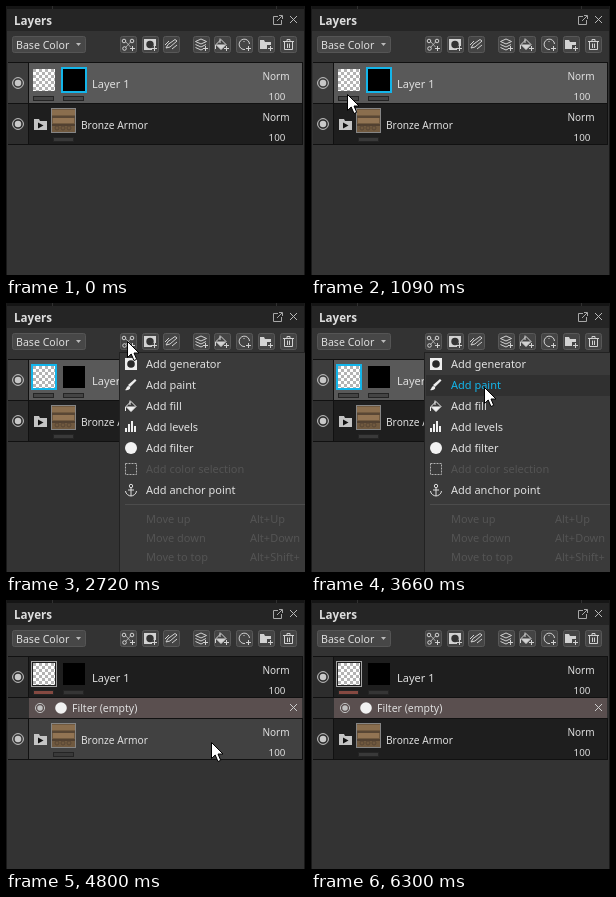
These frames come from a looping animation (299x269 px, 6.64 s). An HTML page with a canvas:

```html
<!DOCTYPE html>
<html lang="en">
<head>
<meta charset="utf-8">
<title>Layers panel</title>
<style>
html, body { margin: 0; width: 100%; height: 100%; overflow: hidden; background: #333; }
canvas { display: block; width: 299px; height: 269px; }
</style>
</head>
<body>
<canvas id="stage" width="299" height="269"></canvas>
<script>
const ctx = document.getElementById('stage').getContext('2d');
const LOOP = 6640;
const CYAN = '#13b5ea', LIGHT = '#dedede';

// Pointer moves: start, end, step count, destination
const START = [150, 280];
const MOVES = [
  [460, 1090, 8, 36, 88],
  [1180, 1270, 2, 35, 75],
  [1850, 2480, 8, 121, 38],
  [3250, 3840, 8, 204, 111],
  [3930, 4470, 7, 205, 142],
  [5860, 6300, 6, 277, 247]
];
const MENU = ['Add generator', 'Add paint', 'Add fill', 'Add levels',
  'Add filter', 'Add color selection', 'Add anchor point'];
const MOVE_ITEMS = [['Move up', 'Alt+Up'], ['Move down', 'Alt+Down'], ['Move to top', 'Alt+Shift+']];

function pointerAt(t) {
  let [x, y] = START;
  for (const [start, end, steps, toX, toY] of MOVES) {
    if (t < start) break;
    const step = Math.min(steps, 1 + Math.floor((t - start) * (steps - 1) / (end - start) + 1e-6));
    x += (toX - x) * step / steps;
    y += (toY - y) * step / steps;
  }
  return { x: Math.round(x), y: Math.round(y), visible: t >= 460 && t < 6300 };
}

function rect(x, y, w, h, color) {
  ctx.fillStyle = color;
  ctx.fillRect(x, y, w, h);
}

function frame(x, y, w, h, color, width = 1) {
  ctx.strokeStyle = color;
  ctx.lineWidth = width;
  ctx.strokeRect(x + width / 2, y + width / 2, w - width, h - width);
}

function rounded(x, y, w, h, color, border) {
  ctx.beginPath();
  ctx.roundRect(x + .5, y + .5, w - 1, h - 1, 2);
  ctx.fillStyle = color;
  ctx.fill();
  ctx.strokeStyle = border;
  ctx.lineWidth = 1;
  ctx.stroke();
}

function disc(x, y, r, color) {
  ctx.beginPath();
  ctx.arc(x, y, r, 0, Math.PI * 2);
  ctx.fillStyle = color;
  ctx.fill();
}

function ring(x, y, r, color, width = 1) {
  ctx.beginPath();
  ctx.arc(x, y, r, 0, Math.PI * 2);
  ctx.strokeStyle = color;
  ctx.lineWidth = width;
  ctx.stroke();
}

function shape(path, x, y, { fill, stroke, width = 1 }) {
  const p = new Path2D(path);
  ctx.save();
  ctx.translate(x, y);
  if (fill) { ctx.fillStyle = fill; ctx.fill(p); }
  if (stroke) { ctx.strokeStyle = stroke; ctx.lineWidth = width; ctx.stroke(p); }
  ctx.restore();
}

function text(str, x, y, size = 11, color = LIGHT, align = 'left', weight = 400) {
  ctx.font = `${weight} ${size}px "Noto Sans", "Open Sans", sans-serif`;
  ctx.textAlign = align;
  ctx.fillStyle = color;
  ctx.fillText(str, x, y);
}

// Icons use a 17px box with its corner at x, y
function bucket(x, y, color) {
  shape('M3 8.5L8 3.5L13 8.5L8 13.5Z', x, y, { stroke: color });
  shape('M3 8.5H13L8 13.5Z', x, y, { fill: color });
  shape('M7 7V2.5M2.5 9v4', x, y, { stroke: color });
}
const plus = (x, y, color) => shape('M12.5 10v5M10 12.5h5', x, y, { stroke: color });

const TOOLS = [
  [114, (x, y, c) => {
    shape('M5.5 5.5L10.5 11M11 5.5L5.5 11.5', x, y, { stroke: c, width: .7 });
    for (const [dx, dy] of [[4, 5], [12, 5], [4.5, 12.5]]) ring(x + dx, y + dy, 1.8, c);
    plus(x, y, c);
  }],
  [136, (x, y, c) => {
    rect(x + 2, y + 3, 12, 11, c);
    disc(x + 8, y + 8.5, 3.7, '#333333');
    rect(x + 10, y + 10, 5, 5, '#444444');
    plus(x, y, c);
  }],
  [157, (x, y, c) => {
    shape('M3 12L5 8.5L12 3.5L14 5L7 11ZM2 9L6 5M9 13L14 9', x, y, { stroke: c });
  }],
  [187, (x, y, c) => {
    shape('M2.5 5.5L8 3L13.5 5.5L8 8ZM2.5 8.5L8 11L13 8.5M2.5 11.5L8 14L10 13', x, y, { stroke: c });
    plus(x, y, c);
  }],
  [208, (x, y, c) => {
    bucket(x - 1, y, c);
    plus(x, y, c);
  }],
  [230, (x, y, c) => {
    shape('M9 13.5A5.2 5.2 0 1 1 13.5 8M8 5v1', x, y, { stroke: c });
    plus(x, y, c);
  }],
  [252, (x, y, c) => {
    shape('M2 4h4l1 2h6v3h-4v4H2Z', x, y, { fill: c });
    plus(x, y, c);
  }],
  [274, (x, y, c) => {
    shape('M3 5.5h11M7 5V3.5h3V5M4.5 6v7.5h8V6M7.5 7.5v4.5M9.5 7.5v4.5', x, y, { stroke: c });
  }]
];

function drawHeader(t) {
  rect(0, 0, 299, 269, '#333333');
  rect(0, 0, 299, 25, '#252525');
  rect(0, 0, 299, 3, '#151515');
  rect(46, 0, 1, 3, '#303030');
  rect(270, 0, 1, 3, '#303030');
  text('Layers', 8, 19, 11.6, '#dddddd', 'left', 600);
  shape('M5 1.5H.5V9.5H8.5V5M4 6L9 1M6 .5H9.5V4', 267, 9, { stroke: '#a8a8a8' });
  shape('M0 0L7 7M7 0L0 7', 284, 10, { stroke: '#b8b8b8' });

  rounded(6, 30, 74, 17, '#474747', '#555555');
  text('Base Color', 10, 43, 10.6);
  shape('M0 0h5l-2.5 3Z', 70, 37, { fill: '#bbbbbb' });

  TOOLS.forEach(([x, icon], i) => {
    const pressed = i === 0 && t >= 2540 && t < 2720;
    rounded(x, 30, 17, 17, pressed ? '#5c5c5c' : '#444444', '#585858');
    icon(x, 30, '#d2d2d2');
  });
}

function radio(x, y, r, color) {
  ring(x, y, r, color);
  disc(x, y, r * .6, color);
}

function drawRow(y, color, columnColor) {
  rect(2, y - 1, 295, 42, '#111111');
  rect(2, y, 20, 40, columnColor);
  rect(23, y, 273, 40, color);
  radio(12, y + 20, 5.4, '#c8c8c8');
  text('Norm', 270, y + 17, 10, LIGHT, 'center');
  text('100', 271, y + 37, 9.8, LIGHT, 'center');
}

function bar(x, y, fill, border = '#242424') {
  rect(x, y, 21, 5, border);
  rect(x + 1, y + 1, 19, 3, fill);
}

function drawChecker(x, y, size) {
  rect(x, y, size, size, '#ffffff');
  for (let j = 0; j < size; j += 3)
    for (let i = 0; i < size; i += 3)
      if ((i + j) % 2 === 0) rect(x + i, y + j, Math.min(3, size - i), Math.min(3, size - j), '#b4b4b4');
}

function drawPaintLayer(t) {
  const filtered = t >= 4800;
  drawRow(57, filtered ? '#1e1e1e' : '#595959', filtered ? '#2d2d2d' : '#3d3d3d');
  drawChecker(27, 63, 22);
  rect(57, 63, 22, 22, '#000000');
  if (filtered) frame(25, 61, 26, 26, '#a5a5a5');
  else frame(t < 1550 ? 55 : 25, 61, 26, 26, CYAN, 2);
  bar(27, 90, filtered ? '#854941' : '#444444');
  bar(57, 90, filtered ? '#353535' : '#444444');
  text('Layer 1', 86, 82);
}

function drawBronzeThumb(x, y) {
  rect(x, y, 25, 25, '#858585');
  rect(x + 1, y + 1, 23, 23, '#70593f');
  rect(x + 1, y + 2, 23, 5, '#8a6e4e');
  rect(x + 1, y + 8, 23, 2, '#594735');
  rect(x + 2, y + 10, 21, 5, '#927453');
  rect(x + 1, y + 16, 23, 2, '#524131');
  for (let i = 0; i < 3; i++) ring(x + 6 + i * 6, y + 20, 2, '#594735');
}

function drawFolder(y, hovered) {
  drawRow(y, hovered ? '#414141' : '#1e1e1e', hovered ? '#393939' : '#2d2d2d');
  shape('M0 0h5l1 2h7v9H0Z', 28, y + 15, { fill: '#c4c4c4' });
  shape('M4 3.5l5.5 3l-5.5 3Z', 28, y + 15, { fill: '#111111' });
  drawBronzeThumb(45, y + 4);
  bar(47, y + 33, '#393939');
  text('Bronze Armor', 75, y + 25, 10.2);
}

function drawFilterRow() {
  rect(2, 98, 295, 20, '#303030');
  rect(23, 98, 273, 20, '#5a4f4f');
  radio(34, 108, 4.6, '#c0c0c0');
  disc(55, 108, 5.8, '#f2f2f2');
  text('Filter (empty)', 66, 112, 10.5);
  shape('M0 0L7 7M7 0L0 7', 284, 104, { stroke: '#cccccc' });
}

const MENU_ICONS = [
  y => { rect(119, y - 6, 12, 12, '#eeeeee'); disc(125, y, 3.8, '#292929'); },
  y => {
    shape('M4 0L11 -6L12.5 -4.5L6 2Z', 118, y, { fill: '#eeeeee' });
    shape('M0 5C2 4 1 1 4 1C7 3 4 6 0 5Z', 119, y, { fill: '#eeeeee' });
  },
  y => bucket(117, y - 8, '#eeeeee'),
  y => [4, 8, 11, 6].forEach((h, i) => rect(119 + i * 3, y + 5 - h, 2, h, '#eeeeee')),
  y => disc(125, y, 6, '#f2f2f2'),
  y => {
    ctx.setLineDash([2, 1]);
    frame(119, y - 6, 12, 12, '#b0b0b0');
    ctx.setLineDash([]);
  },
  y => {
    ring(125, y - 4, 1.7, '#dddddd');
    shape('M0 -2V6M-3 0H3M-5.5 1C-5.5 4 -2 6 0 6C2 6 5.5 4 5.5 1', 125, y, { stroke: '#dddddd' });
  }
];

function drawMenu(pointer) {
  rect(113, 49, 186, 220, '#222222');
  rect(114, 50, 185, 219, '#3a3a3a');
  MENU.forEach((label, i) => {
    const y = 61 + i * 21;
    const hovered = pointer.y >= y - 10 && pointer.y < y + 11;
    if (hovered) rect(115, y - 10, 184, 21, '#303030');
    MENU_ICONS[i](y);
    text(label, 140, y + 4, 11, i === 5 ? '#545454' : hovered ? CYAN : '#e0e0e0');
  });
  rect(119, 201, 180, 1, '#4c4c4c');
  MOVE_ITEMS.forEach(([label, keys], i) => {
    const y = 220 + i * 19;
    text(label, 140, y, 11, '#545454');
    text(keys, 244, y, 11, '#545454');
  });
}

function drawPointer({ x, y }) {
  shape('M.5 .5V16.5L4.2 13L7 19.5L9.7 18.3L7 12H12Z', x, y,
    { fill: '#ffffff', stroke: '#000000' });
}

function render() {
  const t = performance.now() % LOOP;
  const pointer = pointerAt(t);
  const filtered = t >= 4800;
  const folderY = filtered ? 119 : 98;
  const menuOpen = t >= 2630 && t < 4800;
  const hovered = pointer.visible && !menuOpen && pointer.y >= folderY && pointer.y <= folderY + 41;

  drawHeader(t);
  drawPaintLayer(t);
  drawFolder(folderY, hovered);
  if (filtered) drawFilterRow();
  rect(0, 0, 1, 269, '#191919');
  rect(298, 0, 1, 269, '#191919');
  if (menuOpen) {
    ctx.globalAlpha = t < 2720 ? .5 : 1;
    drawMenu(pointer);
    ctx.globalAlpha = 1;
  }
  if (pointer.visible) drawPointer(pointer);
  requestAnimationFrame(render);
}
render();
</script>
</body>
</html>
```
